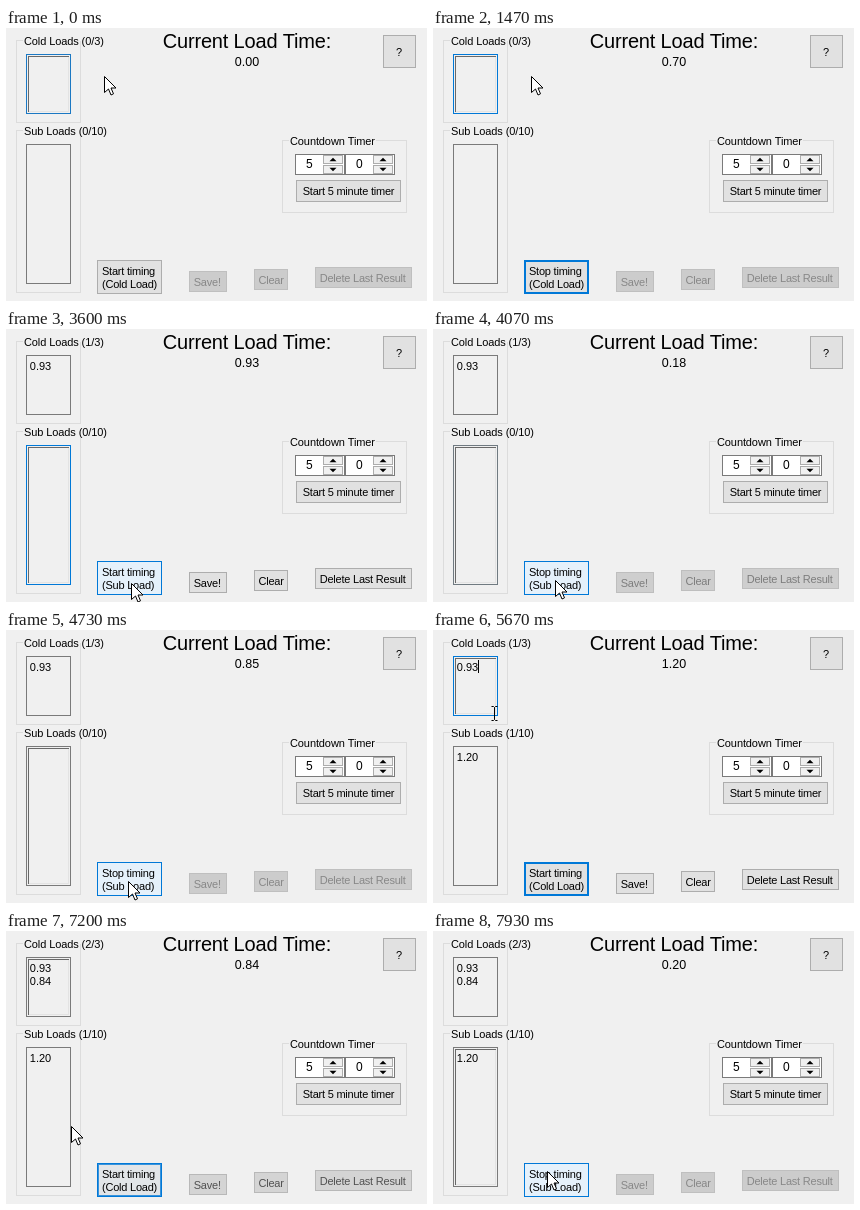
An HTML page with a canvas that plays this animation: 421x273 px, repeating every 8 s.

```html
<!DOCTYPE html>
<html lang="en">
<head>
<meta charset="utf-8">
<title>Load timer</title>
<style>
html, body { margin: 0; width: 100%; height: 100%; overflow: hidden; background: #f0f0f0; }
canvas { display: block; }
</style>
</head>
<body>
<canvas id="stage" width="421" height="273"></canvas>
<script>
const ctx = document.getElementById('stage').getContext('2d');
const LOOP = 8000, TICK = LOOP / 120;
const FACE = '"Liberation Sans", Arial, sans-serif';
const GRAY = [122, 122, 122], BLUE = [0, 120, 215];
const BOX = { Cold: { y: 26, h: 60 }, Sub: { y: 116, h: 140 } };

// Start and length of each timed load; cold and sub loads alternate.
const runs = [[767, 930], [3883, 1200], [6280, 840], [7733, 1000]]
  .map(([start, length]) => ({ start, stop: start + length, result: (length / 1000).toFixed(2) }));
// Where the pointer heads, and when it sets off.
const moves = [
  { at: 0, x: 98, y: 48 },
  { at: 2670, x: 125, y: 254 },
  { at: 3700, x: 122, y: 251 },
  { at: 5250, x: 61, y: 83 },
  { at: 6400, x: 63, y: 193 },
  { at: 7150, x: 114, y: 240 }
];

const clamp = v => Math.min(1, Math.max(0, v));
const fade = (t, at, length = 200) => clamp((t - at) / length);
const ease = p => p * p * (3 - 2 * p);
const lerp = (a, b, p) => a + (b - a) * p;
const mix = (a, b, p) => `rgb(${a.map((v, i) => Math.round(lerp(v, b[i], p)))})`;
const grays = (a, b, p) => mix([a, a, a], [b, b, b], p);
const overButton = p => p.y >= 232;
const overList = (p, { y, h }) => p.x >= 20 && p.x < 65 && p.y >= y && p.y < y + h;

function pointerAt(t) {
  const i = moves.filter(m => m.at <= t).length - 1;
  const to = moves[i], from = moves[Math.max(0, i - 1)];
  const p = ease(fade(t, to.at, 400));
  return {
    x: lerp(from.x, to.x, p),
    y: lerp(from.y, to.y, p),
    hover: lerp(+overButton(from), +overButton(to), fade(t, to.at))
  };
}

function stateAt(t) {
  const begun = runs.filter(r => t >= r.start), done = runs.filter(r => t >= r.stop);
  const last = begun[begun.length - 1], ended = done[done.length - 1];
  const running = begun.length > done.length;
  const switched = runs.filter(r => t >= r.stop + 130).length;
  const lit = !ended ? lerp(.78, 1, fade(t, 70))
    : running || switched < done.length ? 1 - fade(t, last.start)
    : fade(t, ended.stop + 130, 300);
  return {
    running, lit,
    kind: switched % 2 ? 'Sub' : 'Cold',
    on: !ended ? 0 : running ? 1 - fade(t, last.start) : fade(t, ended.stop),
    clock: !last ? '0.00' : running ? ((t - last.start) / 1000).toFixed(2) : last.result,
    colds: done.filter((_, i) => i % 2 === 0).map(r => r.result),
    subs: done.filter((_, i) => i % 2).map(r => r.result)
  };
}

function fill(x, y, w, h, color) {
  ctx.fillStyle = color;
  ctx.fillRect(x, y, w, h);
}
function frame(x, y, w, h, color, line = 1) {
  ctx.strokeStyle = color;
  ctx.lineWidth = line;
  ctx.strokeRect(x + line / 2, y + line / 2, w - line, h - line);
}
function text(s, x, y, { size = 11, gap = 0, color = '#000' } = {}) {
  ctx.font = `${size}px ${FACE}`;
  ctx.letterSpacing = gap + 'px';
  ctx.fillStyle = color;
  ctx.fillText(s, x, y);
}
function group(label, x, y, w, h) {
  frame(x, y, w, h, '#dcdcdc');
  ctx.font = `11px ${FACE}`;
  ctx.letterSpacing = '-.1px';
  fill(x + 7, y, ctx.measureText(label).width + 2, 1, '#f0f0f0');
  text(label, x + 8, y + 5, { gap: -.1 });
}
function button(label, x, y, w, h, tx, ty, on = 1) {
  fill(x, y, w, h, grays(204, 225, on));
  frame(x, y, w, h, grays(191, 173, on));
  text(label, tx, ty, { gap: -.22, color: grays(136, 0, on) });
}
function list(kind, values, state) {
  const { y, h } = BOX[kind], active = kind === state.kind;
  frame(20, y, 45, h, mix(GRAY, BLUE, active ? state.lit : 0));
  if (active) {
    frame(22, y + 2, 41, h - 4, '#e3e3e3');
    fill(22, y + 2, 41, 1, '#696969');
    fill(22, y + 2, 1, h - 4, '#696969');
  }
  values.forEach((v, i) => text(v, 23.8, y + 15 + 13 * i));
}
function spinner(x, value) {
  fill(x, 126, 50, 21, '#fff');
  frame(x, 126, 50, 21, '#7a7a7a');
  text(value, x + 11, 140, { size: 12 });
  for (const [y, dir] of [[127, -1], [137, 1]]) {
    fill(x + 28, y, 20, 9, '#f0f0f0');
    frame(x + 28, y, 20, 9, '#acacac');
    ctx.fillStyle = '#000';
    ctx.beginPath();
    ctx.moveTo(x + 34.5, y + 4.5 - 1.7 * dir);
    ctx.lineTo(x + 41.5, y + 4.5 - 1.7 * dir);
    ctx.lineTo(x + 38, y + 4.5 + 1.7 * dir);
    ctx.fill();
  }
}
function mainButton({ running, kind }, focus, hover) {
  fill(91, 232, 65, 34, mix([225, 225, 225], [229, 241, 251], hover));
  frame(91, 232, 65, 34, mix([173, 173, 173], BLUE, focus));
  ctx.globalAlpha = focus * (1 - hover);
  frame(91, 232, 65, 34, '#0078d7', 2);
  ctx.globalAlpha = 1;
  text(running ? 'Stop timing' : 'Start timing', 96, 247, { gap: -.22 });
  text(`(${kind} Load)`, 96, 260, { gap: -.22 });
}
function drawPointer({ x, y }, beam) {
  const path = new Path2D(beam
    ? 'M-3-7H-1L0-6L1-7H3M0-6V6M-3 7H-1L0 6L1 7H3'
    : 'M0 0V16L4 12.5L6.5 18.5L9 17.3L6.5 11.5H11.5Z');
  ctx.save();
  ctx.translate(Math.round(x) + .5, Math.round(y) + .5);
  ctx.lineWidth = 1;
  ctx.strokeStyle = '#000';
  ctx.fillStyle = '#fff';
  if (!beam) ctx.fill(path);
  ctx.stroke(path);
  ctx.restore();
}

function draw(t) {
  const state = stateAt(t), pointer = pointerAt(t);
  const overCold = overList(pointer, BOX.Cold);

  fill(0, 0, 421, 273, '#f0f0f0');
  group(`Cold Loads (${state.colds.length}/3)`, 10, 12, 65, 83);
  group(`Sub Loads (${state.subs.length}/10)`, 10, 102, 65, 163);
  group('Countdown Timer', 276, 112, 125, 73);
  list('Cold', state.colds, state);
  list('Sub', state.subs, state);
  if (overCold && !state.running) fill(45, 30, 1, 13, '#000');

  text('Current Load Time:', 156.7, 20, { size: 20, gap: -.17 });
  text(state.clock, 228.8, 38, { size: 12.5 });
  spinner(289, '5');
  spinner(339, '0');
  button('Start 5 minute timer', 290, 152, 105, 22, 296.7, 167);
  button('?', 377, 7, 33, 33, 390, 28);
  button('Save!', 183, 243, 38, 21, 187.7, 258, state.on);
  button('Clear', 248, 241, 34, 21, 252.5, 256, state.on);
  button('Delete Last Result', 309, 239, 97, 21, 313.7, 254, state.on);
  mainButton(state, fade(t, 70, 260), pointer.hover);
  drawPointer(pointer, overCold || overList(pointer, BOX.Sub));
}

const origin = performance.now();
function play() {
  const t = (performance.now() - origin) % LOOP;
  // Steps begin on the nearest hundredth of a second.
  draw(Math.floor((t + 5) / TICK) * TICK + .5);
  requestAnimationFrame(play);
}
play();
</script>
</body>
</html>
```
